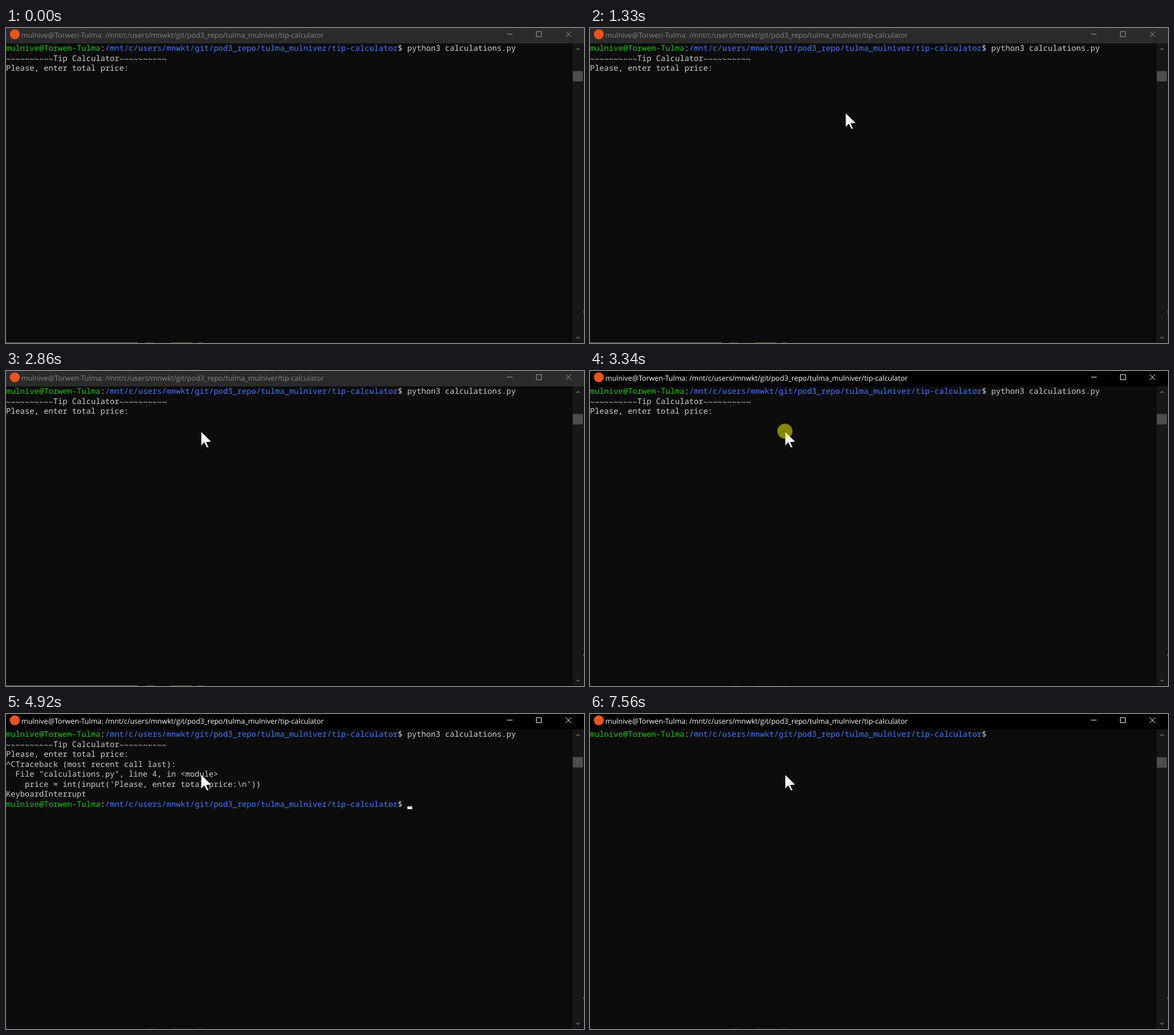
Recreate the animation shown at these times as an HTML page. Size 1013 by 553 pixels, loop 8 s.

```html
<!DOCTYPE html>
<html lang="en">
<head>
<meta charset="utf-8">
<title>Tip Calculator</title>
<style>
  html, body { margin: 0; width: 100%; height: 100%; overflow: hidden; background: #0c0c0c; }
  svg { display: block; width: 1013px; height: 553px; }
  text { white-space: pre; text-rendering: geometricPrecision; }
  #title { font: 12.53px "Open Sans", "Noto Sans", sans-serif; }
  .term { font: 13.79px "Noto Sans Mono", "DejaVu Sans Mono", monospace; fill: #ccc; }
  .term .user { fill: #16c60c; }
  .term .path { fill: #3b78ff; }
</style>
</head>
<body>
<svg viewBox="0 0 1013 553">
  <rect width="1013" height="553" fill="#0c0c0c"/>
  <rect id="bar" width="1013" height="27"/>
  <circle cx="15.5" cy="11" r="8.7" fill="#e95420"/>
  <text id="title" x="27" y="16.5"></text>
  <g id="buttons" fill="none">
    <path d="M878 10.8H888M929.5 6.3H938.7V15.3H929.5ZM981 6.2L990.5 15.7M990.5 6.2L981 15.7"/>
  </g>
  <rect x="993" y="27" width="18" height="525" fill="#171717"/>
  <rect id="thumb" x="993.3" width="17.7" height="18.3" fill="#4d4d4d"/>
  <path d="M999.7 38.5L1002.5 35.7L1005.3 38.5M999.7 542.2L1002.5 545L1005.3 542.2" fill="none" stroke="#858585" stroke-width="1.1"/>
  <path d="M1012.5 27V553" stroke="#262626"/>
  <path d="M1012.5 497V500" stroke="#808080"/>
  <g id="edge">
    <rect y="552" width="231" height="1" fill="#5f7a6d"/>
    <path d="M245 552.5H260M289 552.5H326M336 552.5H346" stroke="#65581f"/>
  </g>
  <path id="dimEdge" d="M245 552.5H260M289 552.5H326M336 552.5H346" stroke="#1c180c"/>
  <g id="screen" class="term"></g>
  <rect id="caret" width="8.6" height="4.7" fill="#f2f2f2"/>
  <path id="pointer" d="M.3 .8V24.4L5.6 19L10 27.8H13L8.7 18.4L17.3 17.8Z" fill="#f5f5f5" stroke="#0c0c0c" stroke-width=".8" paint-order="stroke"/>
  <circle id="click" cx="341.6" cy="105.6" r="13.2" fill="#ff0" fill-opacity=".5"/>
</svg>
<script>
const LOOP = 8000, CELL = 8.274, ROW = 17.5, BASELINE = 40.4, TILDE_DROP = 2;
const FOCUS = 3340, RELEASE = 3490, INTERRUPT = 4920, CLEAR = 5520;
const USER = 'mulnive@Torwen-Tulma';
const PATH = '/mnt/c/users/mnwkt/git/pod3_repo/tulma_mulniver/tip-calculator';
const PROMPT_COLS = USER.length + PATH.length + 3;
const $ = id => document.getElementById(id);

function addText(group, row, col, string, kind = '', drop = 0) {
  const text = document.createElementNS('http://www.w3.org/2000/svg', 'text');
  text.setAttribute('x', col * CELL);
  text.setAttribute('y', Math.floor(BASELINE + row * ROW + .1) + drop);
  text.setAttribute('class', kind);
  text.textContent = string;
  group.append(text);
}

function addGroup() {
  const group = document.createElementNS('http://www.w3.org/2000/svg', 'g');
  $('screen').append(group);
  return group;
}

function addPrompt(group, row) {
  addText(group, row, 0, USER, 'user');
  addText(group, row, USER.length, ':');
  addText(group, row, USER.length + 1, PATH, 'path');
  addText(group, row, PROMPT_COLS - 2, '$');
}

const prompt = addGroup(), program = addGroup(), trace = addGroup();
addPrompt(prompt, 0);
addText(program, 0, PROMPT_COLS, 'python3 calculations.py');
addText(program, 1, 10, 'Tip Calculator');
for (const col of [0, 24]) addText(program, 1, col, '~'.repeat(10), '', TILDE_DROP);
addText(program, 2, 0, 'Please, enter total price:');
[
  [0, '^CTraceback (most recent call last):'],
  [2, 'File "calculations.py", line 4, in <module>'],
  [4, "price = int(input('Please, enter total price:\\n'))"],
  [0, 'KeyboardInterrupt']
].forEach(([col, line], i) => addText(trace, 3 + i, col, line));
addPrompt(trace, 7);
$('title').textContent = `${USER}: ${PATH}`;

// Pointer steps: [time, x, y]
const steps = [[460, 692, 421], [535, 614, 353], [610, 536, 285]];
function glide(start, end, count, x, y) {
  const [, x0, y0] = steps[steps.length - 1];
  for (let i = 0; i < count; i++) {
    const p = (i + 1) / count, k = p * p * (3 - 2 * p);
    steps.push([start + (end - start) * i / (count - 1), x0 + (x - x0) * k, y0 + (y - y0) * k]);
  }
}
glide(1010, 1160, 3, 448, 149);
steps.push([1860, 448.4, 149.3]);
glide(2420, 2860, 7, 342, 106.3);

// Caret states: [time, row, column], row -1 hides it
const carets = [
  [0, -1, 0], [3890, 3, 0], [4440, -1, 0], [INTERRUPT, 7, PROMPT_COLS],
  [CLEAR, 0, PROMPT_COLS], [6550, -1, 0], [7080, 0, PROMPT_COLS], [7560, -1, 0]
];

const current = (table, t) => table.filter(entry => entry[0] <= t).pop();
const show = (node, visible) => node.setAttribute('visibility', visible ? 'visible' : 'hidden');

function render(t) {
  const focused = t >= FOCUS;
  $('bar').setAttribute('fill', focused ? '#000' : '#2b2b2b');
  $('title').setAttribute('fill', focused ? '#fff' : '#858585');
  $('buttons').setAttribute('stroke', focused ? '#fff' : '#a0a0a0');
  $('thumb').setAttribute('y', t < CLEAR ? 75.5 : 76);
  show($('edge'), !focused);
  show($('dimEdge'), focused);
  show(program, t < CLEAR);
  show(trace, t >= INTERRUPT && t < CLEAR);
  show($('click'), focused && t < RELEASE);

  const [, row, col] = current(carets, t);
  show($('caret'), row >= 0);
  $('caret').setAttribute('x', col * CELL + .2);
  $('caret').setAttribute('y', 39.8 + Math.max(row, 0) * ROW);

  const step = current(steps, t);
  show($('pointer'), step);
  if (step) $('pointer').setAttribute('transform', `translate(${step[1]} ${step[2]})`);
}

const began = performance.now();
function tick() {
  render((performance.now() - began) % LOOP);
  requestAnimationFrame(tick);
}
render(0);
requestAnimationFrame(tick);
</script>
</body>
</html>
```
